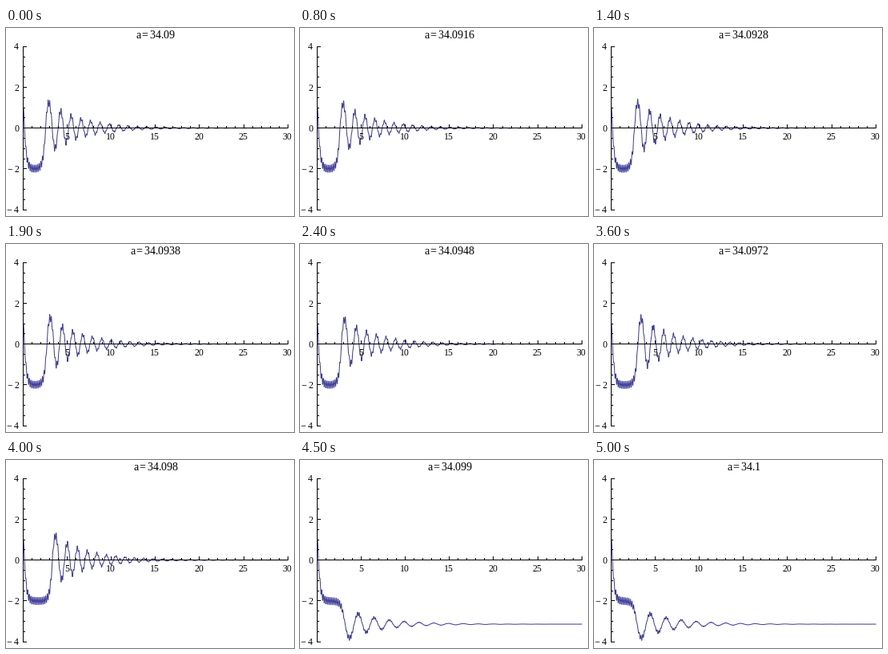
Write a matplotlib script that moves like this. It is 360 by 236 pixels and loops after 5.1 s.

```python
import numpy as np
import matplotlib.pyplot as plt
from matplotlib.animation import FuncAnimation

W, H, DPI = 360, 236, 100
PX = 72 / DPI
X0, Y0 = 21.6, 125.65         # plot origin in pixels
SX, SY = 11.02, 25.6          # pixels per unit
FRAMES, INTERVAL = 51, 100

GRAVITY, DAMPING, AMPLITUDE = 9.8, 0.5, 0.2
START = 1.0
CRITICAL = 34.09835           # drive rate at which the pendulum tips over
DT = 0.0025

plt.rcParams.update({
    "font.family": "Liberation Serif",
    "mathtext.fontset": "custom",
    "mathtext.rm": "Liberation Serif",
})


def swing(a, v, t_end):
    """RK4 for a damped pendulum on a shaken pivot, many runs at once."""
    def accel(t, y, v):
        drive = AMPLITUDE * a * a * np.sin(a * t)
        return -DAMPING * v - (GRAVITY + drive) * np.sin(y)

    y = np.full(np.broadcast(a, v).shape, START)
    v = v + np.zeros_like(y)
    path = [y]
    h = DT / 2
    for k in range(round(t_end / DT)):
        t = k * DT
        k1 = accel(t, y, v)
        v2 = v + h * k1
        k2 = accel(t + h, y + h * v, v2)
        v3 = v + h * k2
        k3 = accel(t + h, y + h * v2, v3)
        v4 = v + DT * k3
        k4 = accel(t + DT, y + DT * v3, v4)
        y = y + DT / 6 * (v + 2 * v2 + 2 * v3 + v4)
        v = v + DT / 6 * (k1 + 2 * k2 + 2 * k3 + k4)
        path.append(y)
    return np.array(path)


def tipping_speed():
    """Initial speed that balances the pendulum at the critical rate."""
    lo, hi = -2.0, 2.0
    for _ in range(3):
        speeds = np.linspace(lo, hi, 401)
        tipped = swing(CRITICAL, speeds, 6)[-1] < -1.5
        n = int(np.clip(tipped.sum(), 1, 400))
        lo, hi = speeds[n - 1], speeds[n]
    return (lo + hi) / 2


rates = 34.09 + 0.0002 * np.arange(FRAMES)
angles = swing(rates, tipping_speed(), 30)[::2]
times = np.linspace(0, 30, len(angles))

fig = plt.figure(figsize=(W / DPI, H / DPI), dpi=DPI, facecolor="white")
ax = fig.add_axes([0, 0, 1, 1])
ax.set_xlim(0, W)
ax.set_ylim(H, 0)
ax.axis("off")


def line(x1, y1, x2, y2):
    """One-pixel line through pixel centres."""
    ax.plot(np.floor([x1, x2]) + 0.5, np.floor([y1, y2]) + 0.5, color="black",
            lw=PX, zorder=3, snap=False, solid_capstyle="projecting")


def label(x, y, text, size, ha):
    return ax.text(x, y, text, fontsize=size * PX, ha=ha, va="baseline",
                   color="black", zorder=4)


def draw_axes():
    line(X0, Y0, X0 + 30 * SX, Y0)
    line(X0, Y0 - 4 * SY, X0, Y0 + 4 * SY)
    for n in range(31):
        x = X0 + n * SX
        major = n % 5 == 0
        line(x, Y0, x, Y0 - (4 if major else 2))
        if major and n:
            label(x - 0.6, 140, str(n), 11.7, "center")
    for n in range(-8, 9):
        y = Y0 - n / 2 * SY
        major = n % 4 == 0
        line(X0, y, X0 + (4 if major else 2), y)
        if major:
            sign = r"-\:" if n < 0 else ""
            label(17, y + 4.2, rf"$\mathrm{{{sign}{abs(n) // 2}}}$", 11.7, "right")


draw_axes()
curve, = ax.plot([], [], color=(0.24, 0.24, 0.6), lw=PX, zorder=2)
title = label(187.3, 13.3, "", 14, "center")


def update(i):
    curve.set_data(X0 + SX * times, Y0 - SY * angles[:, i])
    tighten = r"\hspace{-0.08}"
    title.set_text(rf"$\mathrm{{a{tighten}={tighten}{rates[i]:.6g}}}$")
    return curve, title


anim = FuncAnimation(fig, update, frames=FRAMES, interval=INTERVAL,
                     repeat=True, repeat_delay=0)
plt.show()
```
